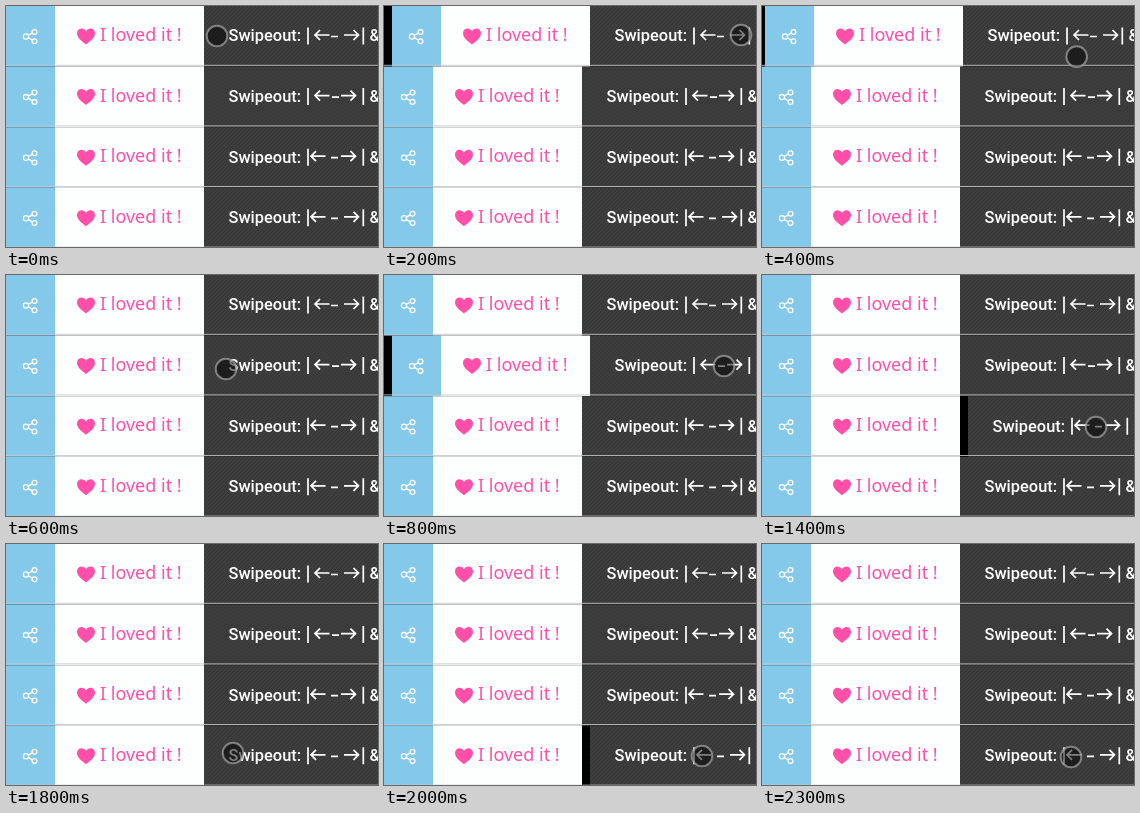
An HTML page that plays this animation: 372x241 px, repeating every 2.4 s.

```html
<!DOCTYPE html>
<html lang="en">
<head>
<meta charset="utf-8">
<title>Swipeout rows</title>
<style>
html, body { margin: 0; width: 100%; height: 100%; overflow: hidden; background: #000; }
svg { display: block; }
.love { font: 18px "Noto Sans", sans-serif; fill: #ff4fa9; }
.label { font: 500 16.4px Roboto, sans-serif; fill: #fff; }
.marks { fill: none; stroke: #fff; stroke-width: 1.7; }
.share { fill: none; stroke: #fff; stroke-width: 1.3; }
</style>
</head>
<body>
<svg width="372" height="241" viewBox="0 0 372 241">
  <defs>
    <pattern id="weave" width="4" height="4" patternUnits="userSpaceOnUse">
      <rect width="4" height="4" fill="#393939"/>
      <path d="M-1 1L1 -1M0 4L4 0M3 5L5 3" stroke="#434343" stroke-width="1"/>
    </pattern>
    <g id="buttons">
      <rect width="49.5" height="61" fill="#84c8ea"/>
      <rect x="49" width="149" height="61" fill="#fdfefe"/>
      <g class="share">
        <circle cx="20" cy="30.5" r="2.6"/>
        <circle cx="28.5" cy="26" r="2.4"/>
        <circle cx="28.5" cy="35.3" r="2.4"/>
        <path d="M22.3 29.3L26.4 27.1M22.3 31.8L26.4 34.1"/>
      </g>
      <path d="M80 38.5C76 35 71 32 71 27.2C71 21.8 77.6 21 80 25.2C82.4 21 89 21.8 89 27.2C89 32 84 35 80 38.5Z" fill="#ff4fa9"/>
      <text class="love" x="94" y="35.3">I loved it !</text>
    </g>
    <path id="left" d="M15.5 0H1M6 -5L1 0L6 5"/>
    <path id="right" d="M0 0H14.5M9.5 -5L14.5 0L9.5 5"/>
  </defs>
  <g id="rows"></g>
  <circle id="cursor" r="10.3" fill="#000" fill-opacity=".5" stroke="#a2a2a2" stroke-opacity=".72" stroke-width="2"/>
</svg>
<script>
const LOOP = 2400, TICK = 100, PITCH = 60.6;

// Arrow and dash positions; sticky buttons travel with the panel.
const rows = [
  { left: 308, dash: 325, right: 338, sticky: true,  start: 1,  shift: [6, 8, 8, 3] },
  { left: 308, dash: 326, right: 335, sticky: true,  start: 7,  shift: [6, 8, 4] },
  { left: 304, dash: 325, right: 335, sticky: false, start: 13, shift: [6, 8, 8, 3] },
  { left: 304, dash: 325, right: 338, sticky: false, start: 19, shift: [5, 8, 8, 3] }
];

// Pointer path: tick, x, y
const path = [
  [0, 211, 30], [1, 290, 29], [2, 357, 29], [3, 362, 29], [6, 220, 94],
  [7, 275, 92], [8, 340, 91], [9, 312, 112], [10, 246, 142], [11, 228, 151],
  [12, 232, 152], [13, 285, 152], [14, 334, 152], [15, 352, 153], [18, 227, 209],
  [19, 262, 210], [20, 318, 212], [21, 345, 213], [22, 335, 213], [23, 309, 213]
];

document.getElementById("rows").innerHTML = rows.map((r, i) => `
  <g transform="translate(0 ${i * PITCH})">
    <rect width="372" height="61"/>
    <use href="#buttons" class="side"/>
    <g class="panel">
      <rect x="198" width="200" height="61" fill="url(#weave)"/>
      <text class="label" x="222.5" y="35.4">Swipeout:</text>
      <g class="marks">
        <path d="M302 21.5V38.5M357.3 21.5V38.5M${r.dash} 30.5h7"/>
        <use href="#left" x="${r.left}" y="29"/>
        <use href="#right" x="${r.right}" y="29"/>
      </g>
      <text class="label" x="363.5" y="35.4">&amp;</text>
    </g>
    <rect y="58.8" width="372" height="1" fill="#c8c7cc" fill-opacity=".85"/>
  </g>`).join("");

const sides = document.querySelectorAll(".side");
const panels = document.querySelectorAll(".panel");
const cursor = document.getElementById("cursor");
const slide = (el, x, y = 0) => el.setAttribute("transform", `translate(${x} ${y})`);

function pointAt(tick) {
  const n = path.findIndex(p => p[0] >= tick);
  const b = path[n], a = path[Math.max(0, n - 1)];
  const k = a === b ? 0 : (tick - a[0]) / (b[0] - a[0]);
  return [a[1] + (b[1] - a[1]) * k, a[2] + (b[2] - a[2]) * k];
}

function draw(now) {
  const tick = Math.floor((now % LOOP) / TICK);
  rows.forEach((r, i) => {
    const dx = r.shift[tick - r.start] || 0;
    slide(panels[i], dx);
    slide(sides[i], r.sticky ? dx : 0);
  });
  slide(cursor, ...pointAt(tick));
}

const begin = performance.now();
function loop() {
  draw(performance.now() - begin);
  requestAnimationFrame(loop);
}
loop();
</script>
</body>
</html>
```
